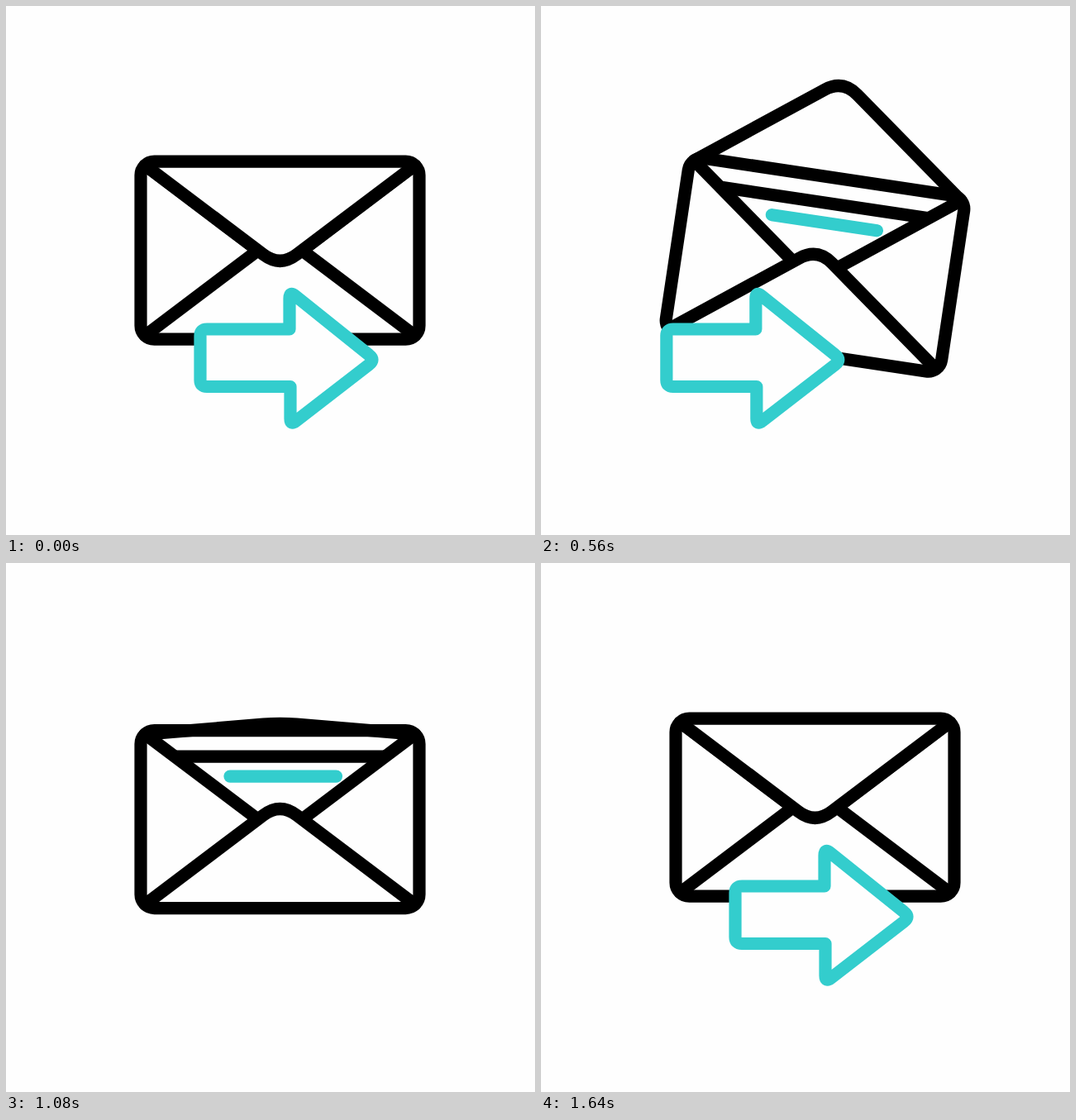
An HTML page for the animation above (1680 ms loop, 640x640 px).

```html
<!DOCTYPE html>
<html lang="en">
<head>
<meta charset="utf-8">
<title>Sending mail</title>
<style>
  html, body { margin: 0; width: 100%; height: 100%; overflow: hidden; background: #fefefe; }
  svg { display: block; width: 100%; height: 100%; }
  path, rect { stroke-width: 15.2; stroke-linejoin: round; stroke-linecap: round; fill: none; }
  .ink { stroke: #000; }
  .teal { stroke: #33cdcd; }
  .solid { fill: #fefefe; }
</style>
</head>
<body>
<svg viewBox="0 0 640 640">
  <clipPath id="window"><rect x="90" y="0" width="483" height="640"/></clipPath>

  <g id="mail">
    <path class="ink" d="M-163.2-103L0 20.2L163.2-103"/>
    <path class="ink" d="M-124-76H126"/>
    <path class="teal" d="M-60.5-52H68"/>
    <path class="ink solid" d="M-163.2 103L-20-5.1Q0-20.2 20-5.1L163.2 103"/>
    <path class="ink" id="flap"/>
    <rect class="ink" x="-168.5" y="-107.5" width="337" height="215" rx="16.5"/>
  </g>

  <g clip-path="url(#window)">
    <path class="teal solid" id="arrow" d="M243 391H343V354Q343 345 350 350.6L439 422
      Q447 428 439 434L351 502Q344 507.5 344 499V460.5H243Q235 460.5 235 452.5V399Q235 391 243 391Z"/>
  </g>
</svg>
<script>
  const LOOP = 1680, STEP = 40;
  const mail = document.getElementById('mail');
  const flap = document.getElementById('flap');
  const arrow = document.getElementById('arrow');

  // Keys are [time, value] pairs, eased in and out between neighbours.
  const tilt = [[120, 0], [350, -13.5], [580, 9], [810, -5.5], [1040, 0]];
  const drop = [[25, 0], [820, 23.2], [1440, 0]];
  const fold = [[55, 1], [450, -1], [848, -1], [1349, 1]];
  const slide = [[24, 0], [510, -89], [1638, 931]];
  const WRAP = 931, WRAP_AT = 1100;

  function ease(keys, t) {
    if (t <= keys[0][0]) return keys[0][1];
    for (let i = 1; i < keys.length; i++) {
      const [t0, a] = keys[i - 1], [t1, b] = keys[i];
      if (t < t1) {
        const p = (t - t0) / (t1 - t0);
        return a + (b - a) * p * p * (3 - 2 * p);
      }
    }
    return keys[keys.length - 1][1];
  }

  function flapPath(s) {
    const y = h => (-103 + h * s).toFixed(2);
    return `M-163.2 ${y(0)}L-20 ${y(108.1)}Q0 ${y(123.2)} 20 ${y(108.1)}L163.2 ${y(0)}`;
  }

  function draw(t) {
    const s = ease(fold, t);
    mail.setAttribute('transform', `translate(331.5 ${295.7 + ease(drop, t)}) rotate(${ease(tilt, t)})`);
    flap.setAttribute('d', flapPath(s));
    flap.classList.toggle('solid', s > 0);

    // The arrow leaves on the right and comes back in from the left.
    const x = ease(slide, t) - (t > WRAP_AT ? WRAP : 0);
    arrow.setAttribute('transform', `translate(${x} 0)`);
  }

  const start = performance.now();
  function tick() {
    const t = (performance.now() - start) % LOOP;
    draw(Math.floor(t / STEP) * STEP);
    requestAnimationFrame(tick);
  }
  tick();
</script>
</body>
</html>
```
